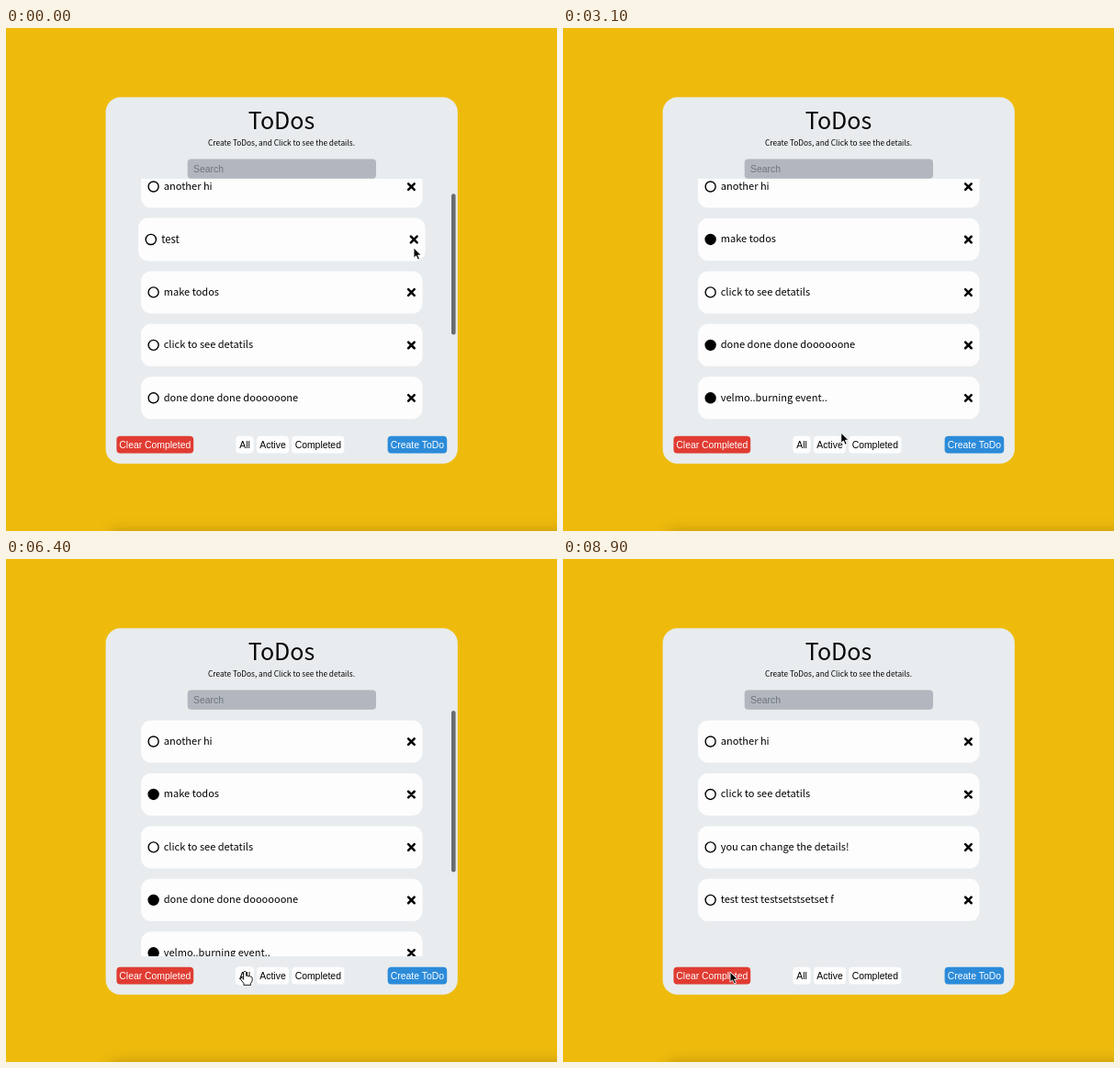
These frames come from a looping animation (600x547 px, 9 s). An HTML page:

```html
<!DOCTYPE html>
<html lang="en">
<head>
<meta charset="utf-8">
<title>ToDos</title>
<style>
  html, body { margin: 0; width: 100%; height: 100%; overflow: hidden; background: #eebb0d; }
  svg { display: block; width: 600px; height: 547px; }
  text { fill: #050505; white-space: pre; }
  .label { font-family: "Noto Sans CJK KR", "Noto Sans CJK JP", "Noto Sans CJK SC", "Noto Sans", sans-serif; }
  .row text { font-size: 11.05px; }
  .ui { font: 10.4px "Liberation Sans", Arial, sans-serif; }
  .ring { fill: none; stroke: #000; stroke-width: 1.4; }
  .ring.done { fill: #000; }
  .cross { stroke: #000; stroke-width: 2.5; stroke-linecap: round; }
</style>
</head>
<body>
<svg viewBox="0 0 600 547">
  <defs>
    <clipPath id="view"><rect x="109" y="164" width="383" height="268"/></clipPath>
    <filter id="soft" x="-20%" y="-200%" width="140%" height="500%"><feGaussianBlur stdDeviation="8"/></filter>
  </defs>
  <rect width="600" height="547" fill="#eebb0d"/>
  <rect x="114" y="547" width="640" height="34" fill="#5a3a00" opacity=".3" filter="url(#soft)"/>
  <rect x="108.6" y="75.2" width="383.2" height="398.6" rx="16" fill="#e8ecee"/>
  <text class="label" x="300" y="109.8" text-anchor="middle" font-size="25">ToDos</text>
  <text class="label" x="300" y="127.6" text-anchor="middle" font-size="8.3">Create ToDos, and Click to see the details.</text>
  <rect x="197.7" y="142.5" width="205.3" height="21.3" rx="4" fill="#b2b7bf"/>
  <text class="ui" x="204" y="157" style="fill:#70747a">Search</text>
  <g id="list" clip-path="url(#view)"></g>
  <rect id="thumb" x="485" width="4.6" rx="2.3" fill="#686c6f"/>
  <g id="bar"></g>
  <g id="cursor">
    <path id="arrow" d="M0 0V11.2L2.6 8.8L4.5 13L6.5 12.1L4.6 8.1H8.2Z" fill="#000" stroke="#fff" stroke-width=".9" stroke-linejoin="round"/>
    <path id="hand" d="M-1.5 1Q0-1 1.4 1V5Q3 4.2 3.8 5.5Q5.3 4.8 6 6Q7.8 5.6 8 7.3V10.5L6.3 13.5V15H-1.2V13.2L-4.8 8.6Q-5.2 6.6-3.2 7.2L-1.5 9Z" fill="#fff" stroke="#000" stroke-width=".9" stroke-linejoin="round"/>
  </g>
</svg>
<script>
const LOOP = 9000, STEP = 100;
const TOP = 164, VIEW = 268, PITCH = 57.45, ROW = 46, GAP = 11.5;
const MID = 300.3, BAR_Y = 453.2, BAR_H = 18.8;

const todos = ['another hi', 'test', 'make todos', 'click to see detatils',
  'done done done doooooone', 'velmo..burning event..',
  'you can change the details!', 'test test testsetstsetset f'];

const buttons = [
  { label: 'Clear Completed', x: 162.3, w: 83.8, fill: '#e03c32', ink: '#fff' },
  { label: 'All', x: 260, w: 19.2, filter: true },
  { label: 'Active', x: 290.5, w: 35, filter: true },
  { label: 'Completed', x: 339.8, w: 57.2, filter: true },
  { label: 'Create ToDo', x: 447.9, w: 64.6, fill: '#2c8bd9', ink: '#fff' }
];

// The pointer travels from go to end, then presses its target at click.
const moves = [
  { go: 0, end: 300, click: 300, hit: 'test', remove: true, to: [444, 233] },
  { go: 600, end: 1200, click: 1200, hit: 'make todos' },
  { go: 1300, end: 1700, click: 1900, hit: 'done done done doooooone' },
  { go: 1900, end: 2300, click: 2400, hit: 'velmo..burning event..' },
  { go: 2600, end: 3300, click: 3600, hit: 'Completed' },
  { go: 3800, end: 4700, click: 4900, hit: 'Active', sag: 17 },
  { go: 4900, end: 5400, click: 6100, hit: 'All' },
  { go: 6200, end: 7100, to: [268, 447] },
  { go: 7200, end: 7600, to: [275, 405] },
  { go: 7800, end: 8200, to: [186, 465] },
  { go: 8200, end: 8500, click: 8800, hit: 'Clear Completed', to: [182, 449] }
];
const wheel = { go: 7300, end: 7600 };
const barShown = [-400, 6100, 7400];

const $ = id => document.getElementById(id);
const clamp = v => Math.min(1, Math.max(0, v));
const part = (span, t) => clamp((t - span.go) / (span.end - span.go));
const ease = p => p * p * (3 - 2 * p);

function el(parent, tag, attrs, text) {
  const node = document.createElementNS('http://www.w3.org/2000/svg', tag);
  for (const key in attrs) node.setAttribute(key, attrs[key]);
  if (text) node.textContent = text;
  return parent.appendChild(node);
}

const rows = todos.map(label => {
  const g = el($('list'), 'g', { class: 'row label' });
  el(g, 'rect', { x: -153.2, y: -ROW / 2, width: 306.4, height: ROW, rx: 11, fill: '#fefdfe' });
  const ring = el(g, 'circle', { cx: -139.7, cy: 0, r: 5.5 });
  el(g, 'text', { x: -128.6, y: 3.5 }, label);
  el(g, 'path', { class: 'cross', d: 'M137.8-3.2L144.4 3.4M144.4-3.2L137.8 3.4' });
  return { g, ring, label };
});

for (const b of buttons) {
  b.g = el($('bar'), 'g', {});
  el(b.g, 'rect', { x: -b.w / 2, y: -BAR_H / 2, width: b.w, height: BAR_H, rx: 4, fill: b.fill || '#fefdfe' });
  el(b.g, 'text', { class: 'ui', y: 3.7, 'text-anchor': 'middle', style: 'fill:' + (b.ink || '#000') }, b.label);
}

// Replays every press up to t and lays out what is left.
function layout(t) {
  const done = new Set();
  let kept = todos, filter = 'All';
  for (const { click, hit, remove } of moves.filter(m => m.click <= t)) {
    if (remove) kept = kept.filter(label => label !== hit);
    else if (todos.includes(hit)) done.add(hit);
    else if (hit === 'Clear Completed') kept = kept.filter(label => !done.has(label));
    else filter = hit;
  }
  const shown = kept.filter(label => filter === 'All' || done.has(label) === (filter === 'Completed'));
  const content = shown.length * PITCH, max = Math.max(0, content - VIEW);
  const scroll = Math.min(max, t < 3600 ? 26 : max * part(wheel, t));
  const y = label => TOP + GAP + ROW / 2 + PITCH * shown.indexOf(label) - scroll;
  return { done, shown, content, scroll, y };
}

let last = [444, 239];
for (const m of moves) {
  const button = buttons.find(b => b.label === m.hit);
  m.from = last;
  m.to = last = m.to || (button ? [button.x - 1, 448.5] : [157, layout(m.go).y(m.hit) + 4]);
}

function pointer(t) {
  const m = moves.filter(m => m.go <= t).pop();
  const p = ease(part(m, t));
  const [x, y] = m.from.map((a, i) => a + (m.to[i] - a) * p);
  return [x, y + (m.sag || 0) * Math.sin(Math.PI * p)];
}

const within = (x, y, cx, cy, w, h) => Math.abs(x - cx) < w / 2 && Math.abs(y - cy) < h / 2;
const overFilter = (b, [x, y]) => b.filter && within(x, y, b.x, BAR_Y, b.w + 1, BAR_H);
const place = (g, x, y, s = 1) => g.setAttribute('transform', `translate(${x} ${y}) scale(${s})`);

function draw(t) {
  const { done, shown, content, scroll, y } = layout(t);
  const now = pointer(t), lag = pointer(Math.max(0, t - STEP));

  for (const { g, ring, label } of rows) {
    const visible = shown.includes(label), cy = y(label);
    g.style.display = visible ? '' : 'none';
    const hover = lag[1] < TOP + VIEW && within(...lag, MID, cy, 306, ROW);
    place(g, MID, cy, hover ? 1.02 : 1);
    ring.setAttribute('class', done.has(label) ? 'ring done' : 'ring');
  }

  const ratio = VIEW / Math.max(content, VIEW);
  const age = t - barShown.filter(s => s <= t).pop();
  $('thumb').setAttribute('y', TOP + 1 + scroll * ratio);
  $('thumb').setAttribute('height', VIEW * ratio - 3);
  $('thumb').setAttribute('opacity', ratio < 1 ? clamp((800 - age) / 300) : 0);

  for (const b of buttons) place(b.g, b.x, BAR_Y, overFilter(b, lag) ? 1.06 : 1);

  const hand = buttons.some(b => overFilter(b, now));
  $('hand').style.display = hand ? '' : 'none';
  $('arrow').style.display = hand ? 'none' : '';
  place($('cursor'), ...now);
}

const start = performance.now();
function tick() {
  const t = (performance.now() - start) % LOOP;
  draw(Math.floor(t / STEP) * STEP);
  requestAnimationFrame(tick);
}
tick();
</script>
</body>
</html>
```
